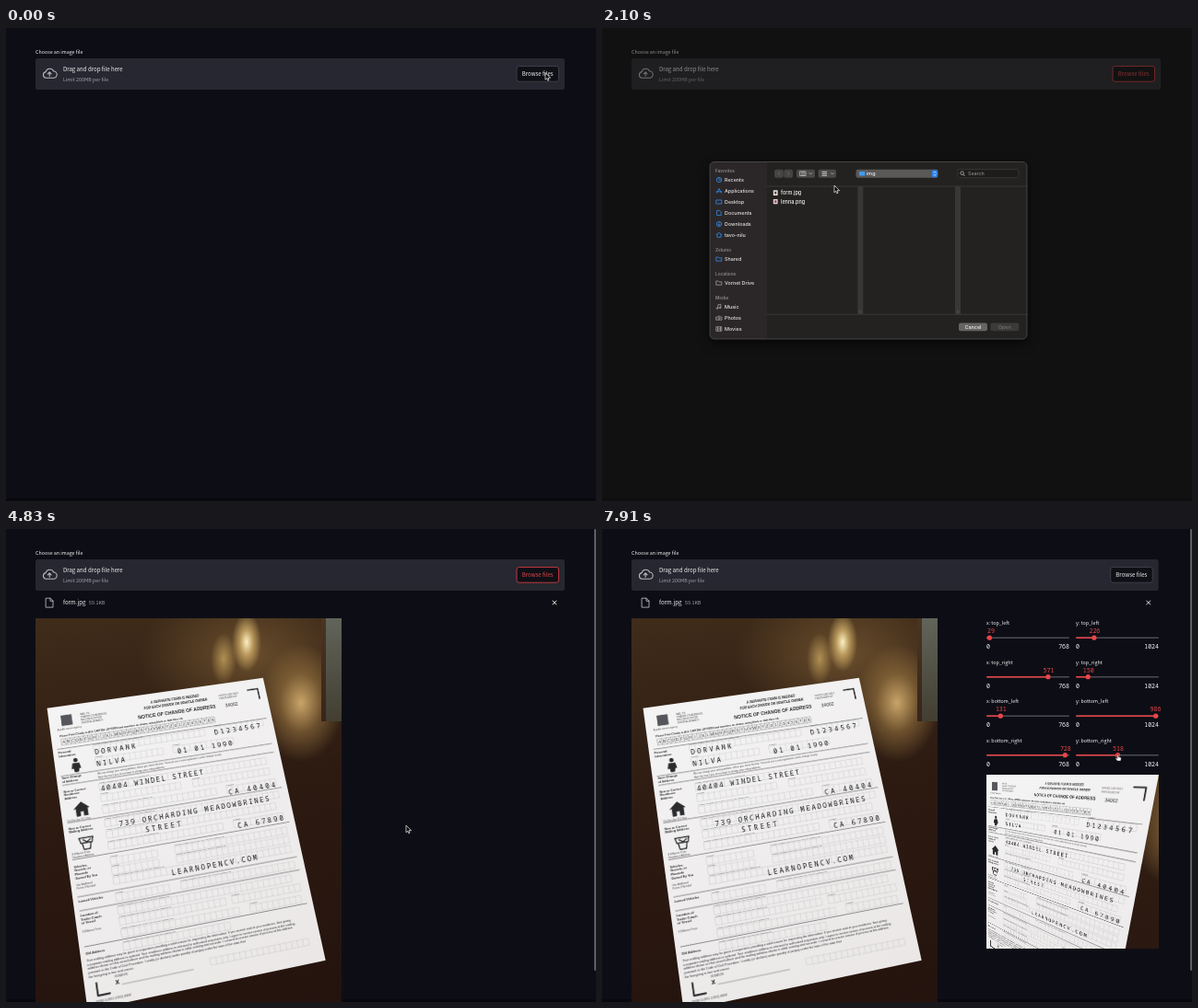
Animation, 640 px wide and 514 px high, one loop 8000 ms. Source, as an HTML page:

```html
<!DOCTYPE html>
<html lang="en">
<head>
<meta charset="utf-8">
<title>Form scanner</title>
<style>
html, body { margin: 0; width: 100%; height: 100%; overflow: hidden; background: #0d0e15; }
#stage { position: absolute; left: 0; top: 0; width: 640px; height: 514px; overflow: hidden; }
#stage > *, .photo, .photo > *, #dialog > * { position: absolute; left: 0; top: 0; transform-origin: 0 0; }
#ui { font-family: "Noto Sans CJK JP", "Noto Sans CJK SC", Lato, sans-serif; font-weight: 500; }
#shade { width: 640px; height: 514px; background: #18160e; }
#dialog { font-family: Inter, sans-serif; font-weight: 500; width: 640px; height: 514px; }
.mono { font-family: "Noto Sans Mono", monospace; }
.doc { font-family: "Liberation Sans", Arial, sans-serif; background: linear-gradient(160deg, #f5f4f4, #eeecec 60%, #eae7e6); }
.hand { font-family: "Noto Sans Mono", monospace; }
.photo, .wood { width: 332px; height: 442.7px; }
.wood {
  background:
    linear-gradient(176deg, #62645a, #423e31) 315px 0 / 17px 112px no-repeat,
    linear-gradient(#4a3520, #38241a) 310px 0 / 5px 112px no-repeat,
    radial-gradient(16px 32px at 229px 26px, #fff0c0, #e0bd72aa 45%, #0000),
    radial-gradient(14px 28px at 204px 44px, #d8b468aa, #0000),
    radial-gradient(46px 64px at 288px 92px, #c9a468, #a07c4488 50%, #0000),
    radial-gradient(120px 75px at 232px 40px, #8a683a99, #0000),
    linear-gradient(172deg, #3f2c1a, #2d1b12 42%, #23120d);
}
#result { left: 417px; top: 267px; width: 187px; overflow: hidden; }
</style>
</head>
<body>
<div id="stage">
  <svg id="ui" width="640" height="514"></svg>
  <div id="big"></div>
  <div id="result"></div>
  <div id="shade"></div>
  <div id="dialog"><svg id="win" width="640" height="514"></svg><div id="thumb"></div></div>
  <svg id="cursor" width="640" height="514"></svg>
</div>
<script>
const $ = id => document.getElementById(id);
const text = (x, y, s, size, fill = '#f4f4f6', more = '') =>
  `<text x="${x}" y="${y}" font-size="${size}" fill="${fill}" ${more}>${s}</text>`;
const rect = (x, y, w, h, fill, r = 0, more = '') =>
  `<rect x="${x}" y="${y}" width="${w}" height="${h}" rx="${r}" fill="${fill}" ${more}/>`;
const path = (d, stroke, width = 1, fill = 'none') =>
  `<path d="${d}" fill="${fill}" stroke="${stroke}" stroke-width="${width}" stroke-linejoin="round" stroke-linecap="round"/>`;
const circle = (x, y, r, fill, more = '') => `<circle cx="${x}" cy="${y}" r="${r}" fill="${fill}" ${more}/>`;
const END = 'text-anchor="end"', MID = 'text-anchor="middle"', BOLD = 'font-weight="700"';
const RED = '#e9454a';

// ---- the paper form, drawn flat ----
const INK = '#2b2b2e';
const comb = (x, y, n, w = 4.7, h = 5.6, stroke = '#bcbabc') => {
  let d = `M${x} ${y}h${n * w}v${h}h${-n * w}z`;
  for (let i = 1; i < n; i++) d += `M${x + i * w} ${y}v${h}`;
  return path(d, stroke, .25);
};
const hand = (x, y, s, pitch) =>
  text(x, y - .4, s, 5.6, '#17171a', `class="hand" letter-spacing="${(pitch - 3.36).toFixed(2)}"`);
const label = (y, ...lines) =>
  lines.map((s, i) => text(421, y + i * 2.9, s, 2.5, INK, BOLD)).join('');
const fine = (x, y, s, size = 1.7, more = '') => text(x, y, s, size, '#4a4a4e', more);

function form() {
  let s = rect(427, 275, 9, 9, '#55575c');
  ['MAIL TO:', 'CHANGE OF ADDRESS', 'RECORDS OFFICE', 'CENTRAL BRANCH'].forEach((l, i) => s += fine(443, 277 + i * 2.5, l, 2));
  s += text(524, 276, 'A SEPARATE FORM IS NEEDED', 2.8, INK, MID + ' font-weight="700" font-style="italic"')
    + text(524, 280.2, 'FOR EACH DRIVER OR VEHICLE OWNER', 2.8, INK, MID + ' font-weight="700" font-style="italic"')
    + text(524, 287.3, 'NOTICE OF CHANGE OF ADDRESS', 4, INK, MID + ' ' + BOLD)
    + fine(562, 278, 'OFFICE USE ONLY', 2) + fine(562, 281, 'PROCESSED BY', 2)
    + text(566, 288, '34002', 4, INK) + path('M588 276h9v9', '#17171a', 1.1)
    + fine(423, 287.5, 'A public service agency', 1.9)
    + text(424, 293, 'Please Print Clearly in ALL CAPITAL LETTERS and numbers as shown, using black or dark blue ink', 2.2, INK, BOLD)
    + comb(425, 295, 36, 3.6, 5, '#55555a')
    + [...'ABCDEFGHIJKLMNOPQRSTUVWXYZ0123456789'].map((c, i) => text(426.8 + i * 3.6, 299, c, 3.2, INK, MID)).join('');

  [[450, 304.5, 20], [553, 303.5, 9], [450, 315, 12], [515, 315, 11], [450, 336.5, 30], [450, 345.5, 14], [526, 345.5, 14],
   [450, 355, 20], [553, 355.5, 9], [450, 366, 31], [450, 375, 30], [450, 384, 20], [553, 384, 9],
   [450, 396, 8], [502, 396, 20], [450, 403.5, 8], [502, 403.5, 20], [450, 411, 31], [450, 424, 9], [502, 424, 20],
   [450, 434, 30], [450, 442, 18], [540, 442, 12], [450, 451, 20], [553, 451, 9], [450, 460.5, 18]]
    .forEach(([x, y, n]) => s += comb(x, y, n) + fine(x, y - .5, n > 16 ? 'STREET NUMBER AND NAME, CITY, DO NOT ABBREVIATE' : 'NUMBER', 1.5));
  [303, 325.5, 333, 363.5, 392.5, 421, 431.5, 458].forEach(y => s += path(`M421 ${y}H599`, '#4c4c50', .4));
  s += fine(450, 328.5, 'We can change your voting address unless you check the box. You must use a new registration card to change county.', 2)
    + fine(450, 331.6, 'Mark the box if you do not want to change your voting address.', 2);

  s += label(307, 'Personal', 'Information') + label(328, 'Voter Change', 'of Address')
    + label(339, 'New or Correct', 'Residence', 'Address') + label(369, 'New or Correct', 'Mailing Address')
    + label(399, 'Vehicles,', 'Vessels, or', 'Placards', 'Owned By You') + label(425.5, 'Leased Vehicles')
    + label(436, 'Location of', 'Trailer Coach', 'or Vessel') + label(464, 'Old Address');
  [[363, 'Do Not Use P.O. Box'], [389, 'If Different From'], [391.5, 'Residence Address'], [413, 'Use Additional'], [415.5, 'Forms if Needed'], [448, 'If Different From']]
    .forEach(([y, l]) => s += fine(421, y, l, 2));
  s += circle(434, 314, 1.7, INK) + path('M431.5 316.7h5l1 4h-1.5l-.5 3h-3l-.5-3h-1.5z', INK, .5, INK)
    + path('M427.5 353.5l6-5 6 5h-1.5v6h-3v-3.5h-3v3.5h-3v-6z', INK, .5, INK)
    + path('M428 377h11l-1 4h-9zM430 381l1 5h5l1-5M431 378.5l3 2 3-2', INK, .9);

  s += hand(552, 311, 'D1234567', 5.3) + hand(450.5, 312, 'DORVANK', 5.1) + hand(450.5, 322, 'NILVA', 5)
    + hand(518, 322, '01 01 1990', 4.9) + hand(451, 343, '40404 WINDEL STREET', 4.55) + hand(554, 363, 'CA 40404', 5.3)
    + hand(461, 373.5, '739 ORCHARDING MEADOWBRINES', 4.7) + hand(481, 381.5, 'STREET', 5.2)
    + hand(556, 391, 'CA 67890', 5.1) + hand(496, 418, 'LEARNOPENCV.COM', 4.8);

  ['Your mailing address may be given to requestors providing a valid reason for requesting the information. If you receive mail at your residence, then giving',
   'a separate mailing address is optional. Your residence address is released to authorized requestors only. I agree to receive service of process at the mailing',
   'address shown on this record above and the mailing address shown is valid, existing and accurate. I consent to receive service of process at this address',
   'pursuant to the Code of Civil Procedure. I certify (or declare) under penalty of perjury under the laws of the state that',
   'the foregoing is true and correct.']
    .forEach((l, i) => s += text(421, 469 + i * 2.9, l, 2.4, INK));
  return s + fine(440, 484.2, 'SIGNATURE', 1.8) + text(440, 489, 'X', 4.6, '#111', BOLD)
    + path('M445 489.5H500', '#555', .3) + comb(514, 484, 17, 4.7, 5)
    + path('M426 485v9h9', '#17171a', 1.2) + fine(424, 499, 'FORM 14 (REV. 2/2001) WWW', 1.9);
}

// ---- perspective ----
const SCALE = 332 / 768, DOC_W = 300, DOC_H = 378, START_Y = 860, END_Y = 518;
const corners = brY => [[29, 226], [571, 150], [728, brY], [131, 986]];

// Maps the unit square onto a quad (top-left, top-right, bottom-right, bottom-left).
function toQuad(points) {
  const [[x0, y0], [x1, y1], [x2, y2], [x3, y3]] = points.map(p => p.map(v => v * SCALE));
  const ax = x1 - x2, ay = y1 - y2, bx = x3 - x2, by = y3 - y2;
  const sx = x0 - x1 + x2 - x3, sy = y0 - y1 + y2 - y3, den = ax * by - bx * ay;
  const g = (sx * by - bx * sy) / den, h = (ax * sy - sx * ay) / den;
  return new DOMMatrix([x1 - x0 + g * x1, y1 - y0 + g * y1, 0, g, x3 - x0 + h * x3, y3 - y0 + h * y3, 0, h,
    0, 0, 1, 0, x0, y0, 0, 1]);
}
const paper = toQuad(corners(START_Y)).scale(1 / DOC_W, 1 / DOC_H);
const photo = `<div class="photo"><div class="wood"></div><svg class="doc" width="${DOC_W}" height="${DOC_H}"
  viewBox="417 267 187 235.6" preserveAspectRatio="none" style="transform:${paper}">${form()}</svg></div>`;

$('big').innerHTML = $('result').innerHTML = $('thumb').innerHTML = photo;
$('big').style.cssText = 'left:32px;top:97px';
$('thumb').style.cssText = 'left:336px;top:176px;transform:scale(.2012)';

function warp(brY) {
  const [tl, tr, br, bl] = corners(brY);
  const dist = (a, b) => Math.hypot(a[0] - b[0], a[1] - b[1]);
  const h = 187 * Math.max(dist(tl, bl), dist(tr, br)) / Math.max(dist(tl, tr), dist(bl, br));
  $('result').style.height = h + 'px';
  $('result').firstChild.style.transform =
    new DOMMatrix().scale(187, h).multiply(toQuad([tl, tr, br, bl]).inverse());
}

// ---- web page ----
function slider(col, row, name, value, max) {
  const x = 417 + col * 97, y = 118.2 + row * 42.5, w = 90, k = x + value / max * w;
  const lx = Math.min(Math.max(k, x + 4.5), x + w - 4);
  return text(x, y - 13.8, `${'xy'[col]}: ${name}`, 5.35)
    + text(lx + .5, y - 4.8, value, 6.6, RED, `class="mono" ${MID}`)
    + rect(x, y - .8, w, 1.6, '#4a4b54', .8) + rect(x, y - .8, k - x, 1.6, RED, .8) + circle(k, y, 2.6, RED)
    + text(x, y + 12, 0, 6.6, '#f4f4f6', 'class="mono"') + text(x + w, y + 12, max, 6.6, '#f4f4f6', 'class="mono" ' + END);
}

function page({ loaded, panel, red, brY }) {
  const shift = panel ? -2.3 : 0;
  let s = rect(0, 511, 640, 3, '#08090f') + text(32, 28, 'Choose an image file', 5.35)
    + rect(32, 33, 574 + shift, 34, '#262730', 2.5)
    + path('M43.5 54.3a3.4 3.4 0 0 1-.4-6.7a4.6 4.6 0 0 1 8.6-.6a3.6 3.6 0 0 1-.3 7.3zM47.2 52.3v-4M45.3 49.8l1.9-2 1.9 2', '#b9bac0', 1.1)
    + text(62, 47.4, 'Drag and drop file here', 6.1) + text(62, 58.2, 'Limit 200MB per file', 5.35, '#a0a2aa')
    + rect(554 + shift, 41.5, 45.5, 16.7, '#0e1016', 2.5, `stroke="${red ? '#d03a3f' : '#41424b'}" stroke-width=".9"`)
    + text(576.7 + shift, 52.2, 'Browse files', 6.1, red ? '#e0484c' : '#f4f4f6', MID);
  if (loaded) s += path('M43.5 75.2h4.6l2.9 2.9v7h-7.5zM48 75.3v3h3', '#c8c9ce', .8)
    + text(62, 82.2, 'form.jpg', 6.1) + text(90, 82.1, '59.1KB', 5.35, '#a0a2aa')
    + path(`M${593 + shift} 78l4 4m0-4l-4 4`, '#f4f4f6', .9) + rect(638, 0, 2, 480, '#5d5e66', 1);
  if (panel) corners(brY).forEach(([x, y], i) => {
    const row = [0, 1, 3, 2][i], name = ['top_left', 'top_right', 'bottom_right', 'bottom_left'][i];
    s += slider(0, row, name, x, 768) + slider(1, row, name, y, 1024);
  });
  return s;
}

// ---- file dialog ----
const BLUE = '#2f8df0', GREY = '#a09c9b';
const icons = {
  clock: 'M129.7 0a2.7 2.7 0 1 1-5.4 0a2.7 2.7 0 1 1 5.4 0M127-1.6V.2h1.2',
  app: 'M124.5 2.3L127-2.5l2.5 4.8M124.2.8h5.6',
  desk: 'M124.2-2h5.6v4h-5.6z', doc: 'M125-2.6h2.6l1.5 1.5v3.7H125z',
  down: 'M129.7 0a2.7 2.7 0 1 1-5.4 0a2.7 2.7 0 1 1 5.4 0M127-1.4V1.3m-1-1l1 1 1-1',
  home: 'M124-.2l3-2.5 3 2.5M125-.6v3h4v-3', folder: 'M124.2-2h2l.8.9h2.8v3.3h-5.6z',
  music: 'M125.8 1.6v-3.8l3-.6v3.7M125.8 1.6a.8.8 0 1 1-1.6 0a.8.8 0 1 1 1.6 0M128.8.9a.8.8 0 1 1-1.6 0a.8.8 0 1 1 1.6 0',
  photo: 'M124-.9h1.5l.6-.9h1.8l.6.9h1.5v3.1h-6zM128 .5a1 1 0 1 1-2 0a1 1 0 1 1 2 0',
  film: 'M124.2-2.2h5.6v4.4h-5.6zM125.5-2.2v4.4M128.5-2.2v4.4M125.5 0h3'
};
const places = [
  ['Favorites', 155.5], ['Recents', 165, 'clock'], ['Applications', 177, 'app'], ['Desktop', 189, 'desk'],
  ['Documents', 201, 'doc'], ['Downloads', 213, 'down'], ['tavo-nilu', 225, 'home'],
  ['Zelumo', 241], ['Shared', 251, 'folder'], ['Locations', 267], ['Vornet Drive', 277, 'folder'],
  ['Media', 293], ['Music', 303, 'music'], ['Photos', 315, 'photo'], ['Movies', 327, 'film']];

function dialog({ picked, preview, closing }) {
  const button = (x, s, on) => rect(x, 320.5, 31, 8.8, on ? '#656463' : '#3b3a39', 2)
    + text(x + 15.5, 326.9, s, 5.4, on ? '#f0f0f0' : '#757473', MID);
  const line = '#474645', strip = x => rect(x, 172, 6, 139, '#383736') + path(`M${x + 2.4} 307v2.5m1.4-2.5v2.5`, '#666', .4);
  let s = rect(117, 145.5, 344, 192.5, '#232221', 5, 'style="filter:drop-shadow(0 4px 6px #000a)"')
    + path('M179 145.5h-57a5 5 0 0 0-5 5v182.5a5 5 0 0 0 5 5h57z', 'none', 0, closing ? '#232121' : '#2b2728')
    + `<g opacity="${closing ? .38 : 1}">`;
  for (const [name, y, icon] of places) s += icon
    ? `<g transform="translate(0 ${y})">${path(icons[icon], y < 260 ? BLUE : GREY, .8)}</g>` + text(133, y + 2, name, 5.4, '#e6e3e3')
    : text(123, y + 1.7, name, 4.7, '#8b8686', 'font-weight="600"');
  s += '</g>' + rect(187, 153.7, 9.8, 9, '#454443', 2) + rect(197.3, 153.7, 9.8, 9, '#454443', 2)
    + path('M192.6 156.6l-1.6 1.6 1.6 1.6M201.5 156.6l1.6 1.6-1.6 1.6', '#777', .7)
    + rect(211, 153.7, 20, 9, '#4a4948', 2) + rect(234.5, 153.7, 19.5, 9, '#4a4948', 2)
    + path('M215 156h6v4.5h-6zM217 156v4.5M219 156v4.5M225 157.6l1.3 1.3 1.3-1.3M248.5 157.6l1.3 1.3 1.3-1.3', '#c8c8c8', .7)
    + path('M239 156.3h4.6M239 158.3h4.6M239 160.3h4.6', '#b0b0b0', 1.2)
    + rect(275.5, 153.7, 89, 9, '#5a5958', 2) + rect(279, 156, 6.3, 4.6, '#3a9cf2', .8)
    + text(287, 160, 'img', 5.4) + rect(357.8, 154.2, 6.2, 8, closing ? '#5a5958' : '#2a7fe6', 1.6)
    + path('M359.7 157.2l1.2-1.2 1.2 1.2M359.7 159.2l1.2 1.2 1.2-1.2', '#fff', .7)
    + rect(385.8, 153.7, 66, 9, '#1d1c1b', 2, `stroke="${line}" stroke-width=".6"`)
    + circle(390.6, 157.7, 1.8, 'none', 'stroke="#ccc" stroke-width=".7"') + path('M392 159.2l1.4 1.5', '#ccc', .7)
    + text(397, 160.1, 'Search', 5.3, '#8b8a89') + path('M179 172H461M179 311.3H461', line, .6) + strip(277.3);
  if (picked) s += rect(183, 174.5, 90, 9.5, '#4d4c4b', 2);
  s += rect(185.8, 176.3, 4.8, 5.6, '#e8e2dc', .5) + rect(187.2, 177.8, 2, 2.6, '#4a3a30')
    + rect(185.8, 186, 4.8, 5.2, '#e0d4d4', .5) + rect(187, 187.3, 2.4, 2.6, '#a05060')
    + text(194, 181, 'form.jpg', 5.5) + text(194, 190.6, 'lenna.png', 5.5);
  if (preview) s += text(288, 283.2, 'form.jpg', 6.4, '#f4f4f4', 'font-weight="600"')
    + text(288, 291.4, 'JPEG image - 59 KB', 5.4, '#b4b3b2') + text(288, 301.8, 'Information', 5.4, '#f4f4f4', BOLD)
    + text(450, 301.8, 'Show More', 4.9, BLUE, END) + text(288, 311, 'Created', 4.9, '#aaa9a8')
    + text(450, 311, 'Today 16:45', 4.9, '#eee', END)
    + rect(284, 311.3, 170, 3, '#232221') + path('M179 311.3H461', line, .6)
    + rect(455.5, 172.3, 5.2, 138.7, '#2c2b2a') + rect(456.4, 173, 3.3, 98, '#737271', 1.6);
  else s += strip(383);
  return s + button(387, 'Cancel', true) + button(421.3, 'Open', picked)
    + rect(117, 145.5, 344, 192.5, 'none', 5, 'stroke="#5a5857" stroke-width=".7"');
}

// ---- pointer ----
const track = [[0, 585, 49], [630, 585, 49], [840, 582, 50], [1540, 582, 50], [2100, 252, 171.5], [2310, 235, 176],
  [2660, 215, 178], [3360, 215, 178], [4270, 434, 322.5], [5390, 434, 322.5], [6160, 575, 272], [6580, 589.6, 246.5],
  [6930, 589.6, 246.5], [7210, 559.5, 246], [8000, 559.5, 245]];
function pointerAt(t) {
  const i = Math.max(1, track.findIndex(k => k[0] > t));
  const [t0, x0, y0] = track[i - 1], [t1, x1, y1] = track[i];
  const p = (t - t0) / (t1 - t0), e = p * p * (3 - 2 * p);
  return [x0 + (x1 - x0) * e, y0 + (y1 - y0) * e];
}
const within = (t, ...spans) => spans.some(([a, b]) => t >= a && t < b);
const ramp = (t, a, b) => Math.min(1, Math.max(0, (t - a) / (b - a)));

function pointer(t, x, y) {
  const ring = within(t, [140, 210], [2870, 2940], [4340, 4410], [6720, 7420]);
  const isHand = within(t, [700, 1610], [4200, 4550], [6440, 8000]);
  return (ring ? circle(x + .5, y + 1.5, 13, '#ffffff22', 'stroke="#eee" stroke-width="1"')
      + circle(x + .5, y + 1.5, 10, 'none', 'stroke="#ddd" stroke-width=".6"') : '')
    + `<g transform="translate(${x} ${y})">` + (isHand
      ? path('M-.7.6a.7.7 0 0 1 1.4 0v2l2.3.5q.9.3.7 1.3l-.5 2.6h-3.7l-2-2.6q-.1-1 1-.6l.8.6z', '#111', .5, '#fff')
      : path('M0 0v7.2l1.7-1.5 1.1 2.5 1.2-.5-1.1-2.5h2.3z', '#fff', .7, '#000')) + '</g>';
}

const drawn = {};
function put(id, markup) {
  if (drawn[id] !== markup) $(id).innerHTML = drawn[id] = markup;
}
const show = (id, on) => $(id).style.display = on ? '' : 'none';

function frame(now) {
  const t = Math.floor(now % 8000 / 70) * 70;
  const [x, y] = pointerAt(t);
  const loaded = t >= 4690, panel = t >= 5110, preview = t >= 3010, closing = t >= 4410;
  const brY = t < 6930 ? START_Y : Math.round((x - 514) / 90 * 1024);
  put('ui', page({ loaded, panel, red: t >= 700 && t < 6720, brY }));
  show('big', loaded);
  show('result', panel);
  warp(t < 7630 ? START_Y : END_Y);

  const open = t >= 1190 && t < 4550;
  show('dialog', open);
  show('thumb', preview);
  if (open) put('win', dialog({ picked: t >= 2870, preview, closing }));
  $('dialog').style.opacity = ramp(t, 1120, 1330);
  $('dialog').style.transform = `translateY(${closing ? -2 : 0}px)`;
  $('shade').style.opacity = open ? .45 * ramp(t, 1120, 1400) - .27 * ramp(t, 4340, 4480) : 0;
  put('cursor', pointer(t, x, y));
  requestAnimationFrame(frame);
}
requestAnimationFrame(frame);
</script>
</body>
</html>
```
